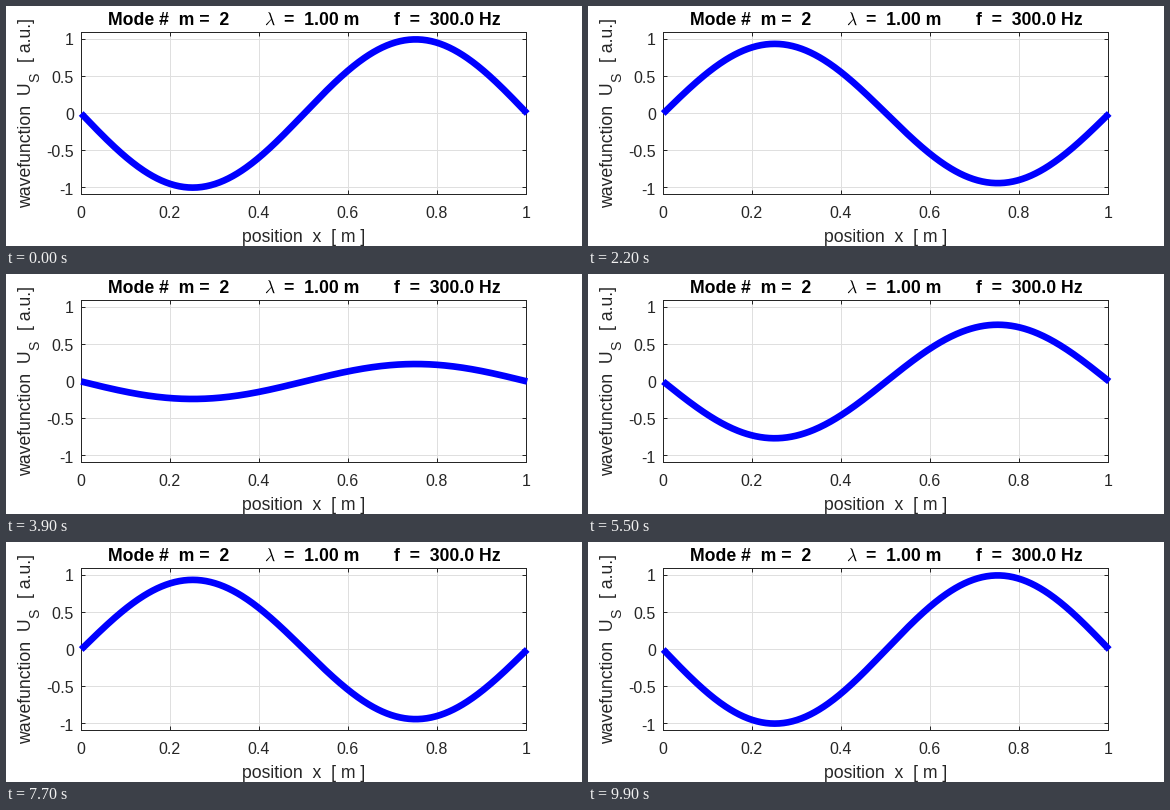
A matplotlib script for the animation above (10 s loop, 576x240 px).

```python
import numpy as np
import matplotlib.pyplot as plt
from matplotlib.animation import FuncAnimation

W, H, DPI = 576, 240, 96
FRAMES, INTERVAL = 100, 100
CYCLES = 2
INK = (0.15, 0.15, 0.15)
TICK_PT, LABEL_PT, SUB_PT = 12, 13.2, 10.56

plt.rcParams["font.family"] = "Liberation Sans"
plt.rcParams["axes.linewidth"] = 0.75

fig = plt.figure(figsize=(W / DPI, H / DPI), dpi=DPI, facecolor="white")


def add_area(left, right, top, bottom, unit):
    """Axes for x in 0..1, in pixels from the top left; unit is pixels per y."""
    area = fig.add_axes([left / W, 1 - bottom / H, (right - left) / W, (bottom - top) / H])
    y_max = (bottom - top) / 2 / unit
    area.set_xlim(0, 1)
    area.set_ylim(-y_max, y_max)
    return area


def put(x, y, s, size=LABEL_PT, color=INK, **kw):
    """Place text with its baseline at pixel (x, y) from the top left."""
    return fig.text(x / W, 1 - y / H, s, fontsize=size, color=color, va="baseline", **kw)


# The frame and grid sit on whole pixels, the curve does not
LEFT, RIGHT = 75.2, 520.45
ax = add_area(LEFT, RIGHT, 26.2, 188.4, 74.05)
wave_ax = add_area(LEFT, 521.2, 26, 189, 74.1)
wave_ax.axis("off")

x_ticks = np.linspace(0, 1, 6)
y_ticks = np.linspace(-1, 1, 5)
ax.set_xticks(x_ticks)
ax.set_yticks(y_ticks)
ax.tick_params(direction="in", length=3.3, width=0.75, color=INK,
               top=True, right=True, labelbottom=False, labelleft=False)
ax.grid(color="0.873", linewidth=0.75)
ax.set_axisbelow(True)
for spine in ax.spines.values():
    spine.set_color(INK)

for v in x_ticks:
    put(LEFT + v * (RIGHT - LEFT) - 0.6, 212, f"{v:g}", TICK_PT, ha="center")
for v in y_ticks:
    put(67.8, round(114 - v * 74.8), f"{v:g}", TICK_PT, ha="right")

# Title
put(101.5, 19, "Mode #  m =  2", color="black", weight="bold")
put(257.5, 19, r"$\lambda$", color="black", math_fontfamily="cm")
put(278, 19, "=  1.00 m", color="black", weight="bold")
put(388, 19, "f  =  300.0 Hz", color="black", weight="bold")

# Axis labels
put(298, 236, "position  x  [ m ]", ha="center")
upright = dict(rotation=90, rotation_mode="anchor", ha="left")
put(25, 202, "wavefunction  U", **upright)
put(33, 75.5, "S", SUB_PT, **upright)
put(25, 55.7, "[ a.u.]", **upright)

x = np.linspace(0, 1, 401)
mode = np.sin(2 * np.pi * x)
(wave,) = wave_ax.plot(x, -mode, color="blue", linewidth=5,
                       solid_capstyle="butt", clip_on=False)


def update(i):
    phase = 2 * np.pi * CYCLES * i / (FRAMES - 1)
    wave.set_ydata(-np.cos(phase) * mode)
    return (wave,)


anim = FuncAnimation(fig, update, frames=FRAMES, interval=INTERVAL,
                     repeat=True, repeat_delay=0)
plt.show()
```
